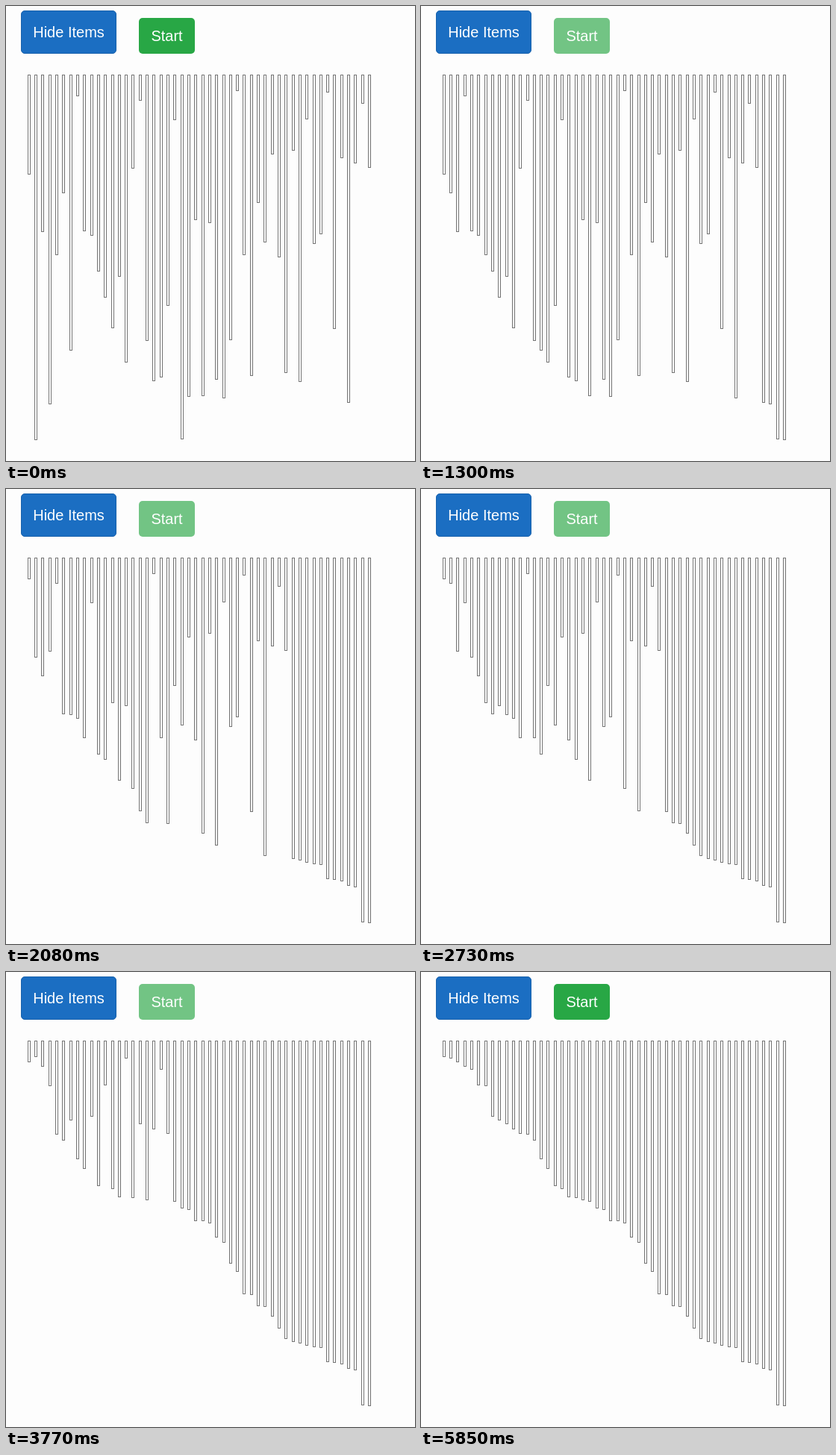
Animation, 548 px wide and 610 px high, one loop 6.24 s. Source, as an HTML page with a canvas:

```html
<!DOCTYPE html>
<html lang="en">
<head>
<meta charset="utf-8">
<title>Bubble sort</title>
<style>
  html, body { margin: 0; width: 100%; height: 100%; overflow: hidden; background: #fdfdfd; }
  canvas { position: absolute; left: 0; top: 0; }
  .btn {
    position: absolute; box-sizing: border-box; border-radius: 5px;
    color: #fff; font: 20px "Liberation Sans", Arial, sans-serif;
    text-align: center; white-space: nowrap;
  }
  #hide { left: 20px; top: 6px; width: 128px; height: 58px; line-height: 56px; background: #1b6ec2; border: 1px solid #1861ac; }
  #start { left: 178px; top: 16px; width: 75px; height: 48px; line-height: 48px; background: #28a745; }
</style>
</head>
<body>
<canvas id="stage" width="548" height="610"></canvas>
<div class="btn" id="hide">Hide Items</div>
<div class="btn" id="start">Start</div>
<script>
const LOOP = 6240, TICK = 130;
const DISABLE_AT = 780, ENABLE_AT = 5850;
const SORT_START = 800, PASS_MS = 102;
const TOP = 92, BAR_W = 4;

// Bottom edge of each bar before sorting
const bars = [
  226, 582, 303, 534, 334, 251, 462, 121, 302, 308,
  356, 391, 432, 363, 478, 218, 127, 449, 503, 498,
  402, 153, 581, 524, 287, 523, 291, 501, 526, 448,
  114, 334, 496, 264, 317, 199, 337, 492, 194, 504,
  152, 319, 306, 116, 433, 204, 532, 211, 131, 217
];

const ctx = document.getElementById("stage").getContext("2d");
const startBtn = document.getElementById("start");

function bubblePass(list) {
  const a = list.slice();
  for (let i = 0; i + 1 < a.length; i++) {
    if (a[i] > a[i + 1]) [a[i], a[i + 1]] = [a[i + 1], a[i]];
  }
  return a;
}

// passes[k] is the list after k bubble passes
const passes = [bars];
while (passes.length < bars.length) passes.push(bubblePass(passes[passes.length - 1]));

function draw(list) {
  ctx.clearRect(0, 0, 548, 610);
  ctx.strokeStyle = "#747474";
  ctx.lineWidth = 1;
  list.forEach((bottom, i) => {
    const x = Math.round(28.86 + 9.309 * i);
    ctx.fillStyle = "#fff";
    ctx.fillRect(x, TOP, BAR_W, bottom - TOP);
    ctx.strokeRect(x + 0.5, TOP + 0.5, BAR_W - 1, bottom - TOP - 1);
  });
}

function render(ms) {
  const t = Math.floor((ms % LOOP) / TICK) * TICK;
  const done = Math.floor((t - SORT_START) / PASS_MS);
  draw(passes[Math.max(0, Math.min(passes.length - 1, done))]);
  startBtn.style.opacity = t >= DISABLE_AT && t < ENABLE_AT ? 0.65 : 1;
}

const t0 = performance.now();
function loop() {
  render(performance.now() - t0);
  requestAnimationFrame(loop);
}
loop();
</script>
</body>
</html>
```
